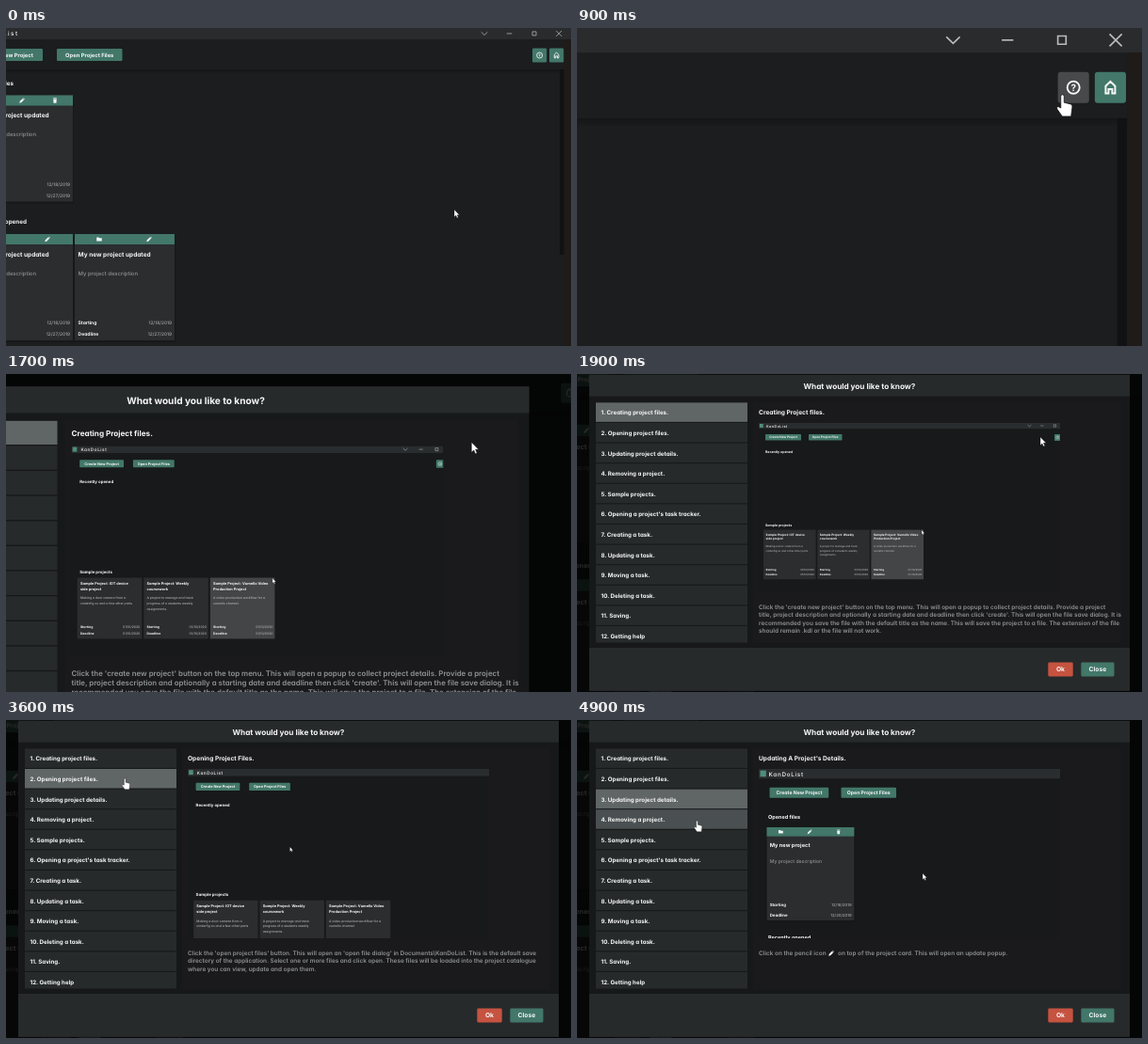
Animation of 600 by 338 pixels, one loop 5 s. Source, as an HTML page:

```html
<!DOCTYPE html>
<html lang="en">
<head>
<meta charset="utf-8">
<title>Help popup</title>
<style>
html, body { margin: 0; width: 100%; height: 100%; overflow: hidden; background: #1b1d1e; }
svg { display: block; width: 100vw; height: 100vh; }
text { font-family: Inter, Lato, sans-serif; font-feature-settings: "cv11"; text-rendering: geometricPrecision; white-space: pre; }
</style>
</head>
<body>
<svg id="stage" viewBox="0 0 600 338" preserveAspectRatio="none"></svg>
<script>
const TEAL = '#427769', GREY = '#8f9395', WHITE = '#f6f7f7', BAR = '#272a2b';
const LOOP = 5000, STEP = 100;
const HOME = { s: 1.115, x: -9, y: -25.9 };   // camera that frames the popup

// ---------- drawing helpers ----------
const rect = (x, y, w, h, fill, more = '') =>
  `<rect x="${x}" y="${y}" width="${w}" height="${h}" fill="${fill}" ${more}/>`;
const text = (x, y, size, str, { fill = WHITE, weight = 700, anchor = 'start', gap = 0 } = {}) =>
  `<text x="${x}" y="${y + size * 0.36}" font-size="${size}" fill="${fill}" font-weight="${weight}" text-anchor="${anchor}" letter-spacing="${gap}">${str}</text>`;
const group = (body, attrs = '') => `<g ${attrs}>${body}</g>`;
const place = (x, y, s, body) => group(body, `transform="translate(${x} ${y}) scale(${s})"`);
const line = (d, w, color = '#b9bcbd') =>
  `<path d="${d}" fill="none" stroke="${color}" stroke-width="${w}"/>`;
const button = (x, y, w, h, label, size, fill = TEAL, id = '') =>
  rect(x, y, w, h, fill, `rx="${h * 0.09}" ${id && `id="${id}"`}`) +
  text(x + w / 2, y + h / 2, size, label, { anchor: 'middle' });

const ICONS = {
  pencil: `<path d="M-2.9 2.9L-2.4 .9L.8 -2.3L2.3 -.8L-.9 2.4ZM1.2 -2.7L1.8 -3.1L3.1 -1.8L2.7 -1.2Z" fill="${WHITE}"/>`,
  folder: `<path d="M-3 -2.2H-.6L.2 -1.4H3V2.2H-3Z" fill="${WHITE}"/>`,
  trash: `<path d="M-2.3 -2.6H-.8V-3H.8V-2.6H2.3V-1.8H-2.3ZM-1.9 -1.4H1.9L1.6 3H-1.6Z" fill="${WHITE}"/>`,
  help: `<circle r="3" fill="none" stroke="${WHITE}" stroke-width=".85"/>` +
    text(0, 0, 4.6, '?', { anchor: 'middle' }),
  house: line('M-2.3 2.9V-.7L0 -2.9L2.3 -.7V2.9H.9V.8H-.9V2.9Z', 0.9, WHITE),
};
const ARROW = '<path d="M0 0V7.8L1.8 6.2L3 8.9L4.3 8.3L3.1 5.7H5.5Z" fill="#fff" stroke="#111" stroke-width=".35"/>';
const HAND = '<path d="M-.8 .8A.8 .8 0 0 1 .8 .8V3.8L4 4.6Q5 4.9 4.8 6L4.2 10.6H-.1L-2.6 7Q-3 6 -2.1 5.8L-.8 6.5Z" fill="#fff" stroke="#111" stroke-width=".35"/>';

const controls = (chevron, min, max, close, y) =>
  line(`M${chevron - 3.3} ${y - 1.6}L${chevron} ${y + 1.6}L${chevron + 3.3} ${y - 1.6}`, 0.75) +
  line(`M${min - 2.8} ${y}H${min + 2.8}`, 0.75) +
  line(`M${max - 2} ${y - 2}h4v4h-4Z`, 0.75) +
  line(`M${close - 3} ${y - 3}l6 6m0 -6l-6 6`, 0.75);

// project card, 106 x 113 at scale 1
function card(x, y, s, title, icons, due) {
  const spots = icons.length === 3 ? [17, 52, 87] : [26, 79];
  return place(x, y, s,
    rect(-1, 1, 108, 114, '#141516', 'opacity=".6" rx="1"') +
    rect(0, 0, 106, 113, '#2b2d2f') + rect(0, 0, 106, 11, TEAL) +
    icons.map((n, i) => place(spots[i], 5.5, 0.92, ICONS[n])).join('') +
    text(3.6, 21.5, 6.5, title) +
    text(3.6, 41.5, 5.9, 'My project description', { fill: GREY, weight: 500 }) +
    [['Starting', '12/18/2019'], ['Deadline', due]].map(([label, date], i) =>
      text(3.6, 94.5 + i * 12, 5, label) +
      text(103, 94.5 + i * 12, 4.8, date, { fill: '#a5a8aa', weight: 500, anchor: 'end' })).join(''));
}

// ---------- main window ----------
function app() {
  const title = 'My new project updated';
  return rect(-60, -5, 720, 400, '#1b1d1e') +
    [0, 1, 2, 3].map(i => rect(-60, 44 + i * 0.9, 653, 0.9, '#121314', `opacity="${0.5 - i * 0.12}"`)).join('') +
    rect(-60, -5, 660, 17, '#292b2d') +
    rect(593, 12, 60, 380, '#1e1b19') +
    rect(588, 44, 4.6, 197, '#111213') +
    text(13.5, 5.3, 6.4, 'KanDoList', { anchor: 'end', gap: 1.4, weight: 500 }) +
    controls(508, 534.5, 561, 587.2, 5.9) +
    button(-36, 22, 75, 13, 'Create New Project', 5.8) +
    button(54, 22, 69.5, 13, 'Open Project Files', 5.8) +
    rect(559, 21.4, 15.2, 15.2, TEAL, 'rx="1.4" id="helpBtn"') +
    rect(577, 21.4, 15.2, 15.2, TEAL, 'rx="1.4"') +
    place(566.6, 29, 1, ICONS.help) + place(584.6, 29, 1, ICONS.house) +
    text(8, 59, 6.3, 'Opened files', { anchor: 'end' }) +
    text(22, 206, 6.3, 'Recently opened', { anchor: 'end' }) +
    card(-35, 71.5, 1, title, ['folder', 'pencil', 'trash'], '12/27/2019') +
    card(-35, 219, 1, title, ['folder', 'pencil'], '12/27/2019') +
    card(73, 219, 1, title, ['folder', 'pencil'], '12/27/2019');
}

// ---------- recordings inside the popup ----------
const SAMPLES = [
  [['Sample Project: IOT device', 'side project'],
    ['Making a door camera from a', 'cinderfig xo and a few other parts']],
  [['Sample Project: Weekly', 'coursework'],
    ['A project to manage and track', 'progress of a students weekly', 'assignments.']],
  [['Sample Project: Vumello Video', 'Production Project'],
    ['A video production workflow for a', 'vumello channel.']],
];

function frameBar(id, titleX = 8) {
  return rect(0, 0, 320, 6.2, '#2a2d2f') + rect(0.9, 1, 3.8, 4, '#4f8d7d') +
    text(titleX, 3.2, 3.8, 'KanDoList', { weight: 500, gap: 0.45 }) +
    button(7, 12, 38, 6.6, 'Create New Project', 3.15) +
    button(53, 12, 35.5, 6.6, 'Open Project Files', 3.15, TEAL, id + 'Open');
}

function catalogue(id) {
  const dim = { fill: '#b0b3b5', weight: 500 };
  const sample = ([title, about], i) => place(5 + 57.2 * i, 113.6, 1,
    rect(0, 0, 55.6, 52.6, '#2b2d2f', `id="${id}Card${i}"`) +
    title.map((s, n) => text(2.6, 4.8 + n * 4.7, 3.15, s)).join('') +
    about.map((s, n) => text(2.6, 17.6 + n * 4.6, 2.75, s, dim)).join('') +
    ['Starting', 'Deadline'].map((s, n) => text(2.6, 42.2 + n * 5.6, 2.75, s) +
      text(54, 42.2 + n * 5.6, 2.75, '01/10/2020', { ...dim, anchor: 'end' })).join(''));
  return frameBar(id) +
    group(controls(479, 501.5, 524, 555, 5), 'transform="scale(.6)"') +
    rect(314, 12, 7, 7, TEAL, 'rx=".6"') + place(317.3, 15.5, 0.5, ICONS.help) +
    text(7, 31, 3.55, 'Recently opened') + text(7, 108.5, 3.55, 'Sample projects') +
    SAMPLES.map(sample).join('');
}

const opened = () => place(0, 0, 1.65, frameBar('v2', 6.4)) +
  text(10, 51.5, 5.5, 'Opened files') +
  card(8.5, 62, 0.876, 'My new project', ['folder', 'pencil', 'trash'], '12/20/2019') +
  text(10, 179.5, 5.5, 'Recently opened');

const PAGES = [
  ['Creating Project files.', catalogue('v0'), 1, [
    "Click the 'create new project' button on the top menu. This will open a popup to collect project details. Provide a project",
    "title, project description and optionally a starting date and deadline then click 'create'. This will open the file save dialog. It is",
    'recommended you save the file with the default title as the name. This will save the project to a file. The extension of the file',
    'should remain .kdl or the file will not work.']],
  ['Opening Project Files.', catalogue('v1'), 1.23, [
    "Click the 'open project files' button. This will open an 'open file dialog' in Documents\\KanDoList. This is the default save",
    'directory of the application. Select one or more files and click open. These files will be loaded into the project catalogue',
    'where you can view, update and open them.']],
  ["Updating A Project's Details.", opened(), 1, ['Click on the pencil icon']],
];

function page([title, body, zoom, lines], i) {
  const soft = { fill: GREY, weight: 600 };
  return group(
    text(193, 41, 6.6, title) +
    group(rect(193, 52, 320, 180, '#17191a') + place(193, 52, zoom, body), 'clip-path="url(#screen)"') +
    lines.map((s, n) => text(193, 248 + n * 8.1, 6.4, s, soft)).join('') +
    (i === 2 ? place(270, 248, 0.95, ICONS.pencil) +
      text(277, 248, 6.4, 'on top of the project card. This will open an update popup.', soft) : ''),
    `id="page${i}"`);
}

// ---------- popup ----------
const TOPICS = ['Creating project files.', 'Opening project files.', 'Updating project details.',
  'Removing a project.', 'Sample projects.', "Opening a project's task tracker.", 'Creating a task.',
  'Updating a task.', 'Moving a task.', 'Deleting a task.', 'Saving.', 'Getting help'];

function popup() {
  return rect(-900, -400, 2400, 1200, '#000', 'opacity=".84"') +
    rect(13, 0.8, 574, 336, '#161819') +
    rect(13, 0.8, 574, 22.9, BAR) + rect(13, 291, 574, 45.8, BAR) +
    text(300, 12.7, 8.2, 'What would you like to know?', { anchor: 'middle' }) +
    rect(187, 30, 391, 256, '#1a191b') +
    group(TOPICS.map((s, i) => rect(20, 30.4 + i * 21.6, 161, 20.5, BAR, `id="row${i}"`) +
      text(25.5, 41.2 + i * 21.6, 6.2, `${i + 1}. ${s}`)).join(''), 'clip-path="url(#list)"') +
    PAGES.map(page).join('') +
    group(ARROW, 'id="mini"') +
    button(500.3, 306.6, 26.4, 14.8, 'Ok', 6.7, '#c55340') +
    button(535.3, 306.6, 35.2, 14.8, 'Close', 6.7);
}

const toWorld = (x, y) => [(x - HOME.x) / HOME.s, (y - HOME.y) / HOME.s];
const stage = document.getElementById('stage');
stage.innerHTML = `<defs>
  <clipPath id="screen"><rect x="193" y="52" width="320" height="180"/></clipPath>
  <clipPath id="list"><rect x="20" y="30" width="161" height="255.5"/></clipPath>
</defs>` + group(
  app() +
  group(place(...toWorld(0, 0), 1 / HOME.s, popup()), 'id="popup"') +
  group(group(ARROW, 'id="arrow"') + group(HAND, 'id="hand"'), 'id="cursor"'),
  'id="world"');

// ---------- motion tables: time, values ----------
const inPopup = (t, x, y) => [t, ...toWorld(x, y)];
const ZOOM_IN = [[100, 0], [200, 0.02], [300, 0.07], [400, 0.16], [500, 0.3025], [600, 0.62], [700, 0.95], [800, 0.975], [1000, 0.992], [1300, 1]];
const ZOOM_OUT = [[1400, 0], [1500, 0.12], [1600, 0.38], [1700, 0.76], [1800, 0.95], [1900, 1]];
const FADE = [[1300, 0], [1400, 0.3], [1500, 0.8], [1600, 1]];
const CURSOR = [
  [100, 476, 193], [200, 478, 188], [300, 490, 160], [400, 516, 102], [500, 542, 55], [600, 551, 41],
  [700, 556, 34], [800, 560, 33], [1000, 562.5, 32], [1200, 563.6, 31.4], [1400, 563.6, 31.4],
  [1500, 553, 37], [1700, 490, 67], inPopup(1900, 492, 67),
  inPopup(2000, 510, 110), inPopup(2100, 530, 170), inPopup(2200, 545, 232), inPopup(2300, 541, 287),
  inPopup(2400, 529, 308), inPopup(2600, 529, 308), inPopup(2700, 500, 285), inPopup(2800, 375, 195),
  inPopup(2900, 205, 98), inPopup(3000, 127, 62), inPopup(3800, 126, 62), inPopup(3900, 126, 67),
  inPopup(4000, 126, 76), inPopup(4100, 125.5, 85), inPopup(4200, 125.5, 91), inPopup(4500, 125.5, 91),
  inPopup(4700, 127, 101), inPopup(4800, 127.5, 106), inPopup(4900, 127.5, 107)];
const MINI = [
  [[1900, 366, 166], [2000, 348, 152], [2200, 308, 128], [2400, 276, 106], [2600, 276, 106], [2800, 248, 84], [3000, 231, 72.5]],
  [[3400, 305, 150], [3800, 298, 120], [3900, 296, 113], [4000, 294, 101], [4100, 291, 86], [4200, 289, 74.5]],
  [[4500, 367, 163]]];

function at(keys, t) {
  const i = keys.findIndex(k => k[0] >= t);
  if (i < 0) return keys[keys.length - 1].slice(1);
  if (i === 0) return keys[0].slice(1);
  const a = keys[i - 1], b = keys[i], f = (t - a[0]) / (b[0] - a[0]);
  return a.slice(1).map((v, n) => v + (b[n + 1] - v) * f);
}

const el = id => document.getElementById(id);
const set = (id, name, value) => el(id).setAttribute(name, value);
const show = (id, on) => set(id, 'display', on ? 'inline' : 'none');
const mix = (a, b, f) => a + (b - a) * f;

function draw(t) {
  const near = 1 + 1.2 * at(ZOOM_IN, t)[0], out = at(ZOOM_OUT, t)[0];
  const s = mix(near, HOME.s, out), x = mix(600 - 600 * near, HOME.x, out), y = mix(0, HOME.y, out);
  set('world', 'transform', `translate(${x} ${y}) scale(${s})`);

  const fade = at(FADE, t)[0];
  const onHelp = t >= 800 && t < 1500;
  show('popup', fade > 0);
  set('popup', 'opacity', fade);
  set('helpBtn', 'fill', onHelp ? '#47494b' : TEAL);

  const [cx, cy] = at(CURSOR, t), hand = onHelp || t >= 3000;
  set('cursor', 'transform', `translate(${cx} ${cy})`);
  show('hand', hand);
  show('arrow', !hand);

  const current = t < 3400 ? 0 : t < 4500 ? 1 : 2;
  const px = cx * HOME.s + HOME.x, py = cy * HOME.s + HOME.y;
  const over = t > 1900 && px < 181 ? Math.floor((py - 30) / 21.6) : -1;
  TOPICS.forEach((_, i) =>
    set('row' + i, 'fill', i === current ? '#606566' : i === over ? '#4a5051' : BAR));
  PAGES.forEach((_, i) => show('page' + i, i === current));

  const [mx, my] = at(MINI[current], t);
  set('mini', 'transform', `translate(${mx} ${my}) scale(${[0.55, 0.6, 0.85][current]})`);
  set('v0Card2', 'fill', t <= 1900 ? '#434546' : '#2b2d2f');
  set('v1Open', 'fill', my < 76 ? '#5c6365' : TEAL);
}

const start = performance.now();
function tick() {
  const t = (performance.now() - start) % LOOP;
  draw(Math.floor(t / STEP) * STEP);
  requestAnimationFrame(tick);
}
tick();
</script>
</body>
</html>
```
